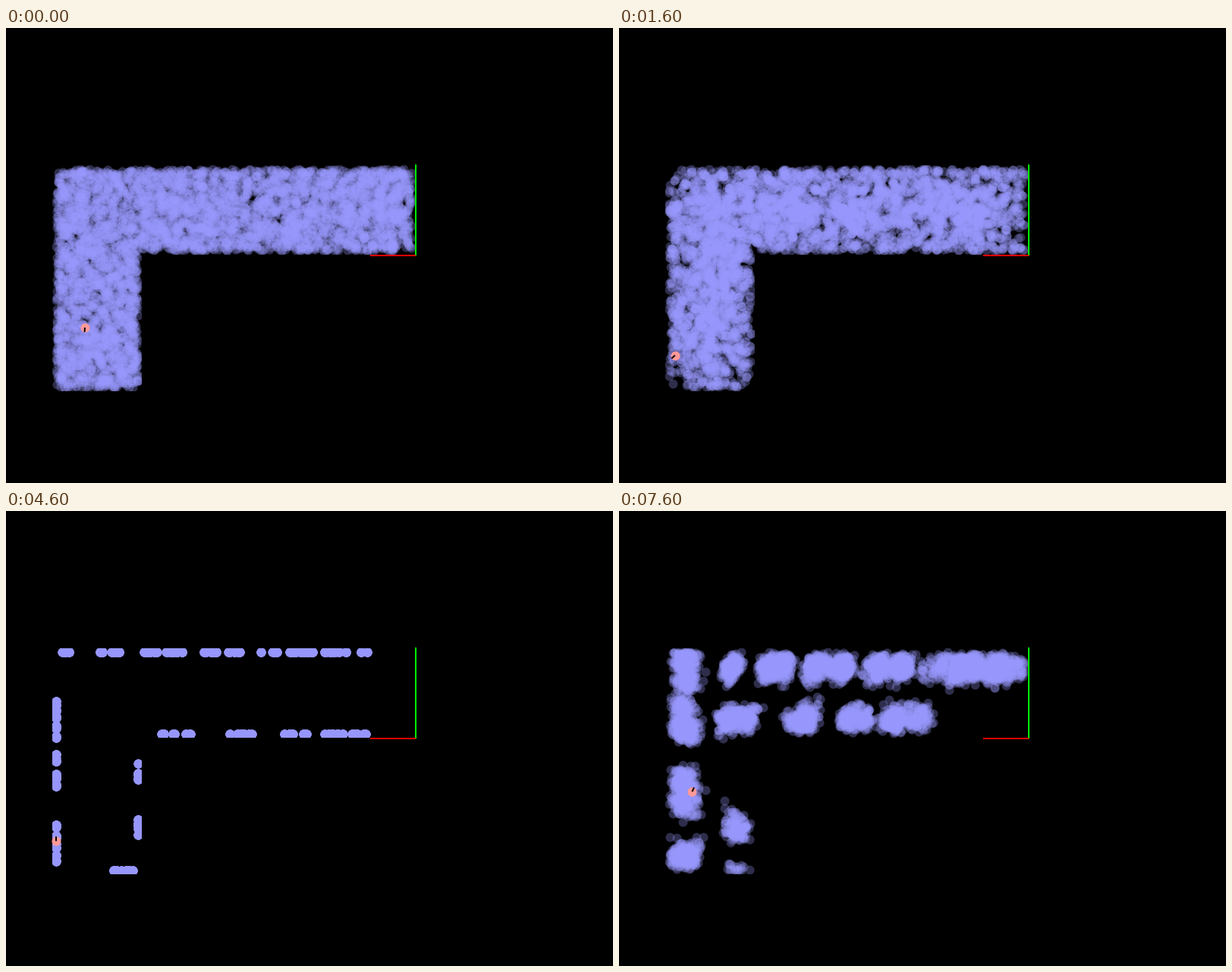
These frames come from a looping animation (800 px wide and 600 px high, 8000 ms). A matplotlib script:

```python
import numpy as np
import matplotlib.pyplot as plt
from matplotlib.animation import FuncAnimation

W, H, DPI = 800, 600, 100
PX = 72 / DPI              # points per pixel
N = 5000                   # particles
STEP, RADIUS = 12, 6       # travel per update, dot size
BUMP, LEAVE, LAST = 5, 11, 16
X0, X1, X2 = 66, 174, 534  # reach of the dot centres in the corridor
Y0, Y1, Y2 = 186, 294, 474
rng = np.random.default_rng(7)

# start, end, inward normal, stretches where particles last (x or y)
WALLS = [
    ((X0, Y0), (X2, Y0), (0, 1),
     [(70, 92), (118, 149), (182, 238), (258, 310), (328, 480)]),
    ((X0, Y2), (X0, Y0), (1, 0), [(248, 300), (317, 364), (401, 463)]),
    ((X2, Y0), (X2, Y1), (-1, 0), []),
    ((X2, Y1), (X1 + 6, Y1), (0, -1), [(200, 248), (293, 327), (364, 477)]),
    ((X1, Y1 + 8), (X1, Y2), (-1, 0), [(330, 357), (404, 427)]),
    ((X1, Y2), (X0, Y2), (0, -1), [(141, 174)]),
]


def heading(theta):
    """Unit vector, theta clockwise from straight down."""
    return np.stack([-np.sin(theta), np.cos(theta)], axis=-1)


def inside(p):
    x, y = p.T
    across = (x >= X0) & (x <= X2) & (y >= Y0) & (y <= Y1)
    down = (x >= X0) & (x <= X1) & (y >= Y0) & (y <= Y2)
    return across | down


def advance(pos, angle):
    """Move every particle; those that hit a wall are drawn again."""
    new = pos + STEP * heading(angle) + rng.normal(0, 2.2, pos.shape)
    ok = inside(new)
    pick = np.arange(len(pos))
    pick[~ok] = rng.choice(np.flatnonzero(ok), (~ok).sum())
    return new[pick], angle[pick]


def wall_points():
    """Rows of x, y, weight, last update alive, angle along the wall."""
    rows = []
    for start, end, _, runs in WALLS:
        start, end = np.array(start), np.array(end)
        span = end - start
        length = np.abs(span).sum()
        axis = np.abs(span).argmax()
        theta = np.arctan2(-span[0], span[1])
        for s in rng.uniform(0, 1, int(length / 3.8)):
            p = start + s * span
            lasting = any(a <= p[axis] <= b for a, b in runs)
            if lasting and rng.random() < .9:
                last = LAST
            else:
                last = min(BUMP - 1 + rng.geometric(.4), LEAVE - 2)
            rows.append((*p, .3 + rng.gamma(2, .5), last, theta))
    return np.array(rows)


def clone(points):
    share = points[:, 2] / points[:, 2].sum()
    count = np.maximum(1, np.round(share * N)).astype(int)
    return np.repeat(points, count, axis=0)


def particle_states(turns):
    pos = rng.uniform((X0, Y0), (X2, Y2), (4 * N, 2))
    pos = pos[inside(pos)][:N]
    angle = rng.uniform(0, 2 * np.pi, N)
    states = [pos]
    for k in range(1, BUMP):
        angle = angle + turns[k] - turns[k - 1] + rng.normal(0, .08, N)
        pos, angle = advance(pos, angle)
        states.append(pos)

    # after the bump only particles touching a wall are left
    points = wall_points()
    for k in range(BUMP, LEAVE):
        cloud = clone(points[points[:, 3] >= k])
        states.append(cloud[:, :2])

    # leave the walls at a shallow angle, each particle a little different
    pos = cloud[:, :2]
    angle = cloud[:, 4] + rng.normal(.25, .12, len(cloud))
    for k in range(LEAVE, LAST + 1):
        pos, angle = advance(pos, angle)
        states.append(pos)
    return states


def robot_path(dirs):
    p = np.array([104.0, 395.0])
    path = [p]
    for k in range(1, LAST + 1):
        move = STEP * dirs[k]
        if k == BUMP:
            move *= (X0 - p[0]) / move[0]   # stops against the left wall
        elif BUMP < k < LEAVE:
            move *= 0                       # turns on the spot
        p = p + move
        path.append(p)
    return path


turns = np.radians(np.interp(np.arange(LAST + 1),
                             [0, 1, 3, 4, BUMP, LEAVE - 1, LEAVE],
                             [5, 27, 47, 47, 65, 180, 205]))
dirs = heading(turns)
robot = robot_path(dirs)
states = particle_states(turns)

fig = plt.figure(figsize=(W / DPI, H / DPI), dpi=DPI, facecolor="black")
ax = fig.add_axes([0, 0, 1, 1])
ax.set_xlim(0, W)
ax.set_ylim(H, 0)
ax.axis("off")


def dots(color, z, alpha=1):
    return ax.plot([], [], "o", ms=2 * RADIUS * PX, mew=0, color=color,
                   alpha=alpha, zorder=z)[0]


def line(xs, ys, color, z):
    return ax.plot(xs, ys, color=color, lw=2 * PX, zorder=z,
                   solid_capstyle="butt", snap=False)[0]


particles = dots("#9999ff", 1, .3)
line([540, 60, 60, 180, 180, 480], [180, 180, 480, 480, 300, 300], "black", 2)
line([540, 540], [180, 300], "#00ff00", 3)
line([480, 540], [300, 300], "#ff0000", 4)
body = dots("#ff9999", 5)
tick = line([], [], "black", 6)


def draw(frame):
    k = (frame + 4) // 5
    particles.set_data(*states[k].T)
    x, y = robot[k]
    dx, dy = dirs[k] * RADIUS
    body.set_data([x], [y])
    tick.set_data([x, x + dx], [y, y + dy])
    return particles, body, tick


anim = FuncAnimation(fig, draw, frames=80, interval=100, repeat=True,
                     repeat_delay=0)
plt.show()
```
